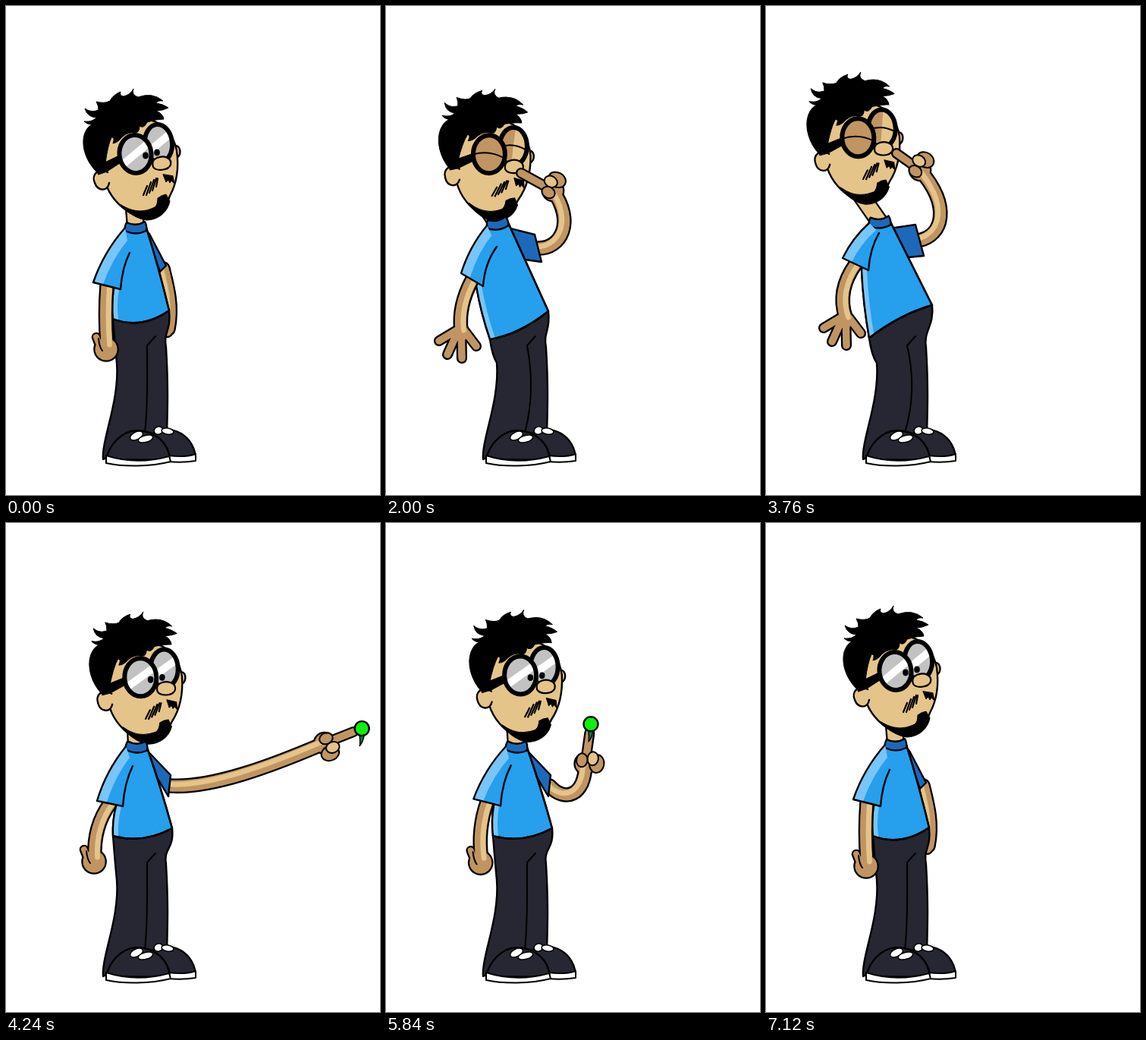
An HTML page with a canvas for the animation above (7200 ms loop, 493 px wide and 644 px high).

```html
<!DOCTYPE html>
<html lang="en">
<head>
<meta charset="utf-8">
<title>Nose</title>
<style>
html, body { margin: 0; width: 100%; height: 100%; overflow: hidden; background: #fff; }
canvas { display: block; }
</style>
</head>
<body>
<canvas id="stage" width="493" height="644"></canvas>
<script>
const ctx = document.getElementById('stage').getContext('2d');
const LOOP = 7200, STEP = 80;
const SKIN = '#e5c489', SHADE = '#c09562', BLUE = '#269fec', DEEP = '#1c69ba',
      PALE = '#78c5f8', DARK = '#272733', INK = '#000';

// Poses. h: head x, y, tilt; c: collar x, y, tilt; s: front sleeve outer, inner, fold;
// w: right hem, left hem, hem bulge, back bulge; r: back sleeve top, bottom, armpit;
// l: front elbow, hand; a: back arm curve, hand, fingertip; f: eyes open, hand spread.
const rest = {
  h: [0, 0, 0], c: [171, 292, 0], s: [115, 364, 151, 373, 163, 325],
  w: [215, 401, 141, 412, 20, 2], r: [211, 342, 203, 350, 190, 315],
  l: [130, 405, 133, 446], a: [213, 370, 220, 395, 214, 425, 213, 430], f: [1, 0]
};
const pick = {
  h: [-29, -2, 7], c: [147, 287, -8], s: [99, 352, 128, 369, 146, 317],
  w: [214, 402, 137, 439, 12, 0], r: [196, 301, 205, 337, 183, 334],
  l: [95, 395, 99, 427], a: [230, 320, 250, 285, 220, 243, 178, 220], f: [0, 1]
};
const dig = {
  h: [-46, -23, 4], c: [150, 285, -3], s: [101, 332, 135, 348, 149, 299],
  w: [219, 394, 136, 437, -10, 0], r: [197, 288, 208, 329, 187, 331],
  l: [93, 375, 105, 410], a: [232, 302, 245, 265, 203, 216, 172, 194], f: [0, 1]
};
const show = {
  h: [17, 7, 8], c: [172, 295, 3], s: [120, 366, 154, 373, 167, 320],
  w: [219, 402, 141, 412, 16, 2], r: [217, 332, 214, 360, 196, 330],
  l: [130, 405, 134, 446], a: [235, 370, 262, 362, 264, 318, 270, 278], f: [1, 0]
};
const eat = {
  h: [47, 18, 10], c: [161, 296, 18], s: [97, 353, 136, 370, 154, 316],
  w: [215, 407, 126, 423, -8, -13], r: [208, 322, 210, 365, 189, 357],
  l: [95, 400, 101, 434], a: [250, 348, 306, 335, 284, 303, 236, 274], f: [0, 1]
};
const raise = {
  ...rest, h: [4, 2, 2], s: [108, 360, 146, 373, 160, 322], r: show.r,
  l: [122, 402, 119, 440], a: [240, 368, 280, 355, 283, 320, 296, 284]
};
const pull = {
  ...pick, h: [-12, 8, 0], c: [158, 291, -4], r: [205, 305, 210, 340, 185, 335],
  l: [70, 365, 46, 345], a: [250, 330, 300, 290, 330, 262, 364, 250], f: [1, 1]
};
const swing = {
  ...show, h: [10, 7, 4], l: [115, 400, 117, 440],
  a: [270, 350, 350, 320, 420, 290, 458, 275]
};
const settle = { ...show, h: [9, 7, 4], a: [250, 370, 310, 350, 325, 305, 340, 268] };
const brace = {
  ...show, h: [-3, -2, -2], s: [106, 358, 145, 371, 160, 318],
  l: [102, 400, 109, 432], a: [235, 365, 265, 355, 260, 315, 265, 274], f: [1, 1]
};
const gulp = { ...eat, a: [255, 352, 318, 330, 298, 300, 252, 276] };
const fling = {
  ...eat, h: [15, 12, 2], c: [167, 294, 6], l: [75, 370, 60, 370],
  a: [250, 345, 310, 320, 330, 290, 350, 262], f: [1, 1]
};

const keys = [[0, rest], [1440, rest], [1600, raise], [1680, raise], [2000, pick]];
for (let t = 2080; t < 3600; t += 400) keys.push([t, pick], [t + 80, dig], [t + 320, pick]);
keys.push([3680, pick], [3760, dig], [4000, pull], [4080, pull], [4240, swing],
  [4400, settle], [4480, settle], [4800, show], [5760, show], [6000, brace],
  [6080, brace], [6320, eat], [6400, gulp], [6480, gulp], [6640, fling],
  [6800, raise], [6880, raise], [7120, rest], [LOOP, rest]);

function poseAt(t) {
  const i = keys.findIndex(k => k[0] > t);
  const [t0, p] = keys[i - 1], [t1, q] = keys[i];
  const k = (t - t0) / (t1 - t0), out = {};
  for (const n in p) out[n] = p[n].map((v, j) => v + (q[n][j] - v) * k);
  for (const b of [160, 560, 5360])
    if (t >= b && t < b + 160) out.f[0] = t < b + 80 ? 0.5 : 0;
  return out;
}

const rad = d => d * Math.PI / 180;

function paint(path, fill, line = 2.4) {
  if (fill) { ctx.fillStyle = fill; ctx.fill(path); }
  if (line) { ctx.strokeStyle = INK; ctx.lineWidth = line; ctx.stroke(path); }
}
const draw = (d, fill, line) => paint(new Path2D(d), fill, line);

function oval(x, y, rx, ry, fill, line, tilt = 0) {
  const p = new Path2D();
  p.ellipse(x, y, rx, ry, rad(tilt), 0, 7);
  paint(p, fill, line);
}

function inside(path, fn) {
  ctx.save();
  ctx.clip(path);
  fn();
  ctx.restore();
}

function strokeWith(path, color, width) {
  ctx.strokeStyle = color;
  ctx.lineWidth = width;
  ctx.stroke(path);
}

// Joined limbs: outline first, then flesh, then a light edge along the arm.
function limb(parts, dx, dy) {
  const all = parts.map(([d, w]) => [new Path2D(d), w]);
  for (const [p, w] of all) strokeWith(p, INK, w + 4.6);
  for (const [p, w] of all) strokeWith(p, SHADE, w);
  ctx.save();
  ctx.translate(dx, dy);
  strokeWith(all[0][0], SKIN, all[0][1] * 0.45);
  ctx.restore();
}

function lens(x, y, rx, ry, px, py, open, second) {
  const p = new Path2D();
  p.ellipse(x, y, rx, ry, rad(-6), 0, 7);
  inside(p, () => {
    ctx.fillStyle = '#c2c2c2';
    ctx.fillRect(x - 30, y - 30, 60, 60);
    strokeWith(new Path2D(`M${x - 24} ${y + 20}L${x + 24} ${y - 20}`), '#fff', 10);
    oval(px, py, 3.8, 4.4, INK, 0);
    if (open < 1) {
      const edge = y - ry + 2 * ry * (1 - open);
      ctx.fillStyle = SHADE;
      ctx.fillRect(x - 30, y - 30, 60, edge - y + 30);
      if (second) {
        ctx.fillStyle = SKIN;
        ctx.fillRect(x, y - 30, 30, edge - y + 30);
      }
      const ly = open ? edge : y + 3;
      draw(`M${x - rx} ${ly}Q${x} ${ly - 9} ${x + rx} ${ly}`, null, 2);
    }
  });
  paint(p, null, 6);
}

function head(p) {
  const [x, y, tilt] = p.h, open = p.f[0];
  ctx.save();
  ctx.translate(150 + x, 150 + y);
  ctx.rotate(rad(tilt));
  ctx.translate(-150, -150);
  oval(224, 192, 5.5, 8, SKIN);
  draw('M130 200L133 238C140 255 154 268 172 277C200 286 212 262 216 250C226 232 228 212 225 190C220 168 208 155 190 150L130 160Z', SKIN);
  draw('M134 219C122 212 112 222 117 233C121 244 134 245 136 233', SKIN);
  draw('M152 262C168 272 182 272 196 265Q200 262 200 253Q205 249 211 248L216 257C213 272 200 282 185 282Q166 279 152 262Z', INK, 1);
  draw('M181 249L186 237M185 249L191 232M189 246L195 229M193 243L198 227M198 238L200 227', null, 2.2);
  draw('M207 222L211 232L214 229L216 233L218 230L222 234L220 224Z', INK, 1);
  draw('M121 220C106 206 99 186 103 170Q106 160 113 156Q107 156 103 152Q114 153 119 147Q107 146 104 135Q112 141 122 137Q122 131 119 126Q130 129 137 125Q141 117 151 113Q149 118 155 119Q164 117 168 109Q165 117 174 120Q193 113 207 125Q200 124 198 128Q207 129 214 134Q206 138 198 138Q207 142 208 149Q198 149 186 153Q182 162 176 158Q176 167 170 167Q158 165 149 177Q146 180 141 181Q144 172 139 173Q134 184 131 207Z', INK, 1);
  draw('M118 212L149 197L150 207L133 218L122 222Z', INK, 1);
  lens(201, 181, 18, 25, 199, 193, open, true);
  lens(170.5, 195, 21, 25, 184, 197, open, false);
  draw('M194 212C198 218 214 217 217 209C219 200 208 196 199 200Q191 203 194 212Z', SKIN, 2.2);
  ctx.restore();
}

function neck(p) {
  const [x, y, tilt] = p.h, a = rad(tilt), u = 18, v = 106;
  const nx = 150 + x + u * Math.cos(a) - v * Math.sin(a);
  const ny = 150 + y + u * Math.sin(a) + v * Math.cos(a);
  const line = new Path2D(`M${nx} ${ny}L${p.c[0]} ${p.c[1]}`);
  strokeWith(line, INK, 24);
  strokeWith(line, SKIN, 19.5);
}

// Shoulder points at both ends of the collar.
function shoulders(p) {
  const [x, y, tilt] = p.c, dx = 14 * Math.cos(rad(tilt)), dy = 14 * Math.sin(rad(tilt));
  return [x - dx, y - dy, x + dx, y + dy];
}

function backArm(p, blob) {
  const [x1, y1, x2, y2, hx, hy, tx, ty] = p.a, r = p.r;
  const d = Math.hypot(tx - hx, ty - hy), ux = (tx - hx) / d, uy = (ty - hy) / d;
  const size = Math.min(13, 4.5 + d * 0.25);
  const at = (u, v) => [hx + ux * u - uy * v, hy + uy * u + ux * v];
  const sx = (r[0] + r[2]) / 2, sy = (r[1] + r[3]) / 2;
  limb([
    [`M${sx} ${sy}C${x1} ${y1} ${x2} ${y2} ${hx} ${hy}`, 15],
    [`M${hx} ${hy}L${tx} ${ty}`, 9.5],
    [`M${hx} ${hy}l.1 0`, size * 2]
  ], -3, -2);
  if (d > 20) {
    const lean = Math.atan2(uy, ux) * 180 / Math.PI;
    for (const [u, v, k, c] of [[2, 15, 12, SHADE], [8, 9, 9, SKIN], [4, -5, 9, SHADE]]) {
      const [x, y] = at(u, v);
      oval(x, y, k, k * 0.8, c, 2, lean);
    }
  }
  if (blob) {
    const bx = tx + ux * 12, by = ty + uy * 12;
    draw(`M${bx - 3} ${by + 9}q1 12 0 14q4 -4 6 -14z`, '#08804a', 1.5);
    oval(bx, by, 9.5, 9.5, '#0df20d');
  }
  const [, , cx, cy] = shoulders(p);
  draw(`M${cx - 4} ${cy}L${cx + 4} ${cy + 8}L${r[0]} ${r[1]}L${r[2]} ${r[3]}L${r[4]} ${r[5]}Z`, DEEP);
}

// Shirt hem from the right hip to the left hip.
const hem = ([rx, ry, lx, ly, bulge]) =>
  `L${rx} ${ry}Q${(rx + lx) / 2} ${(ry + ly) / 2 + bulge} ${lx} ${ly}`;

function legs(p) {
  const [rx, ry, lx, ly] = p.w, knee = Math.min(ly + 38, 460);
  draw(`M211 450C207 428 ${rx + 3} ${ry + 28} ${rx} ${ry}${hem(p.w)}Q${lx + 3} ${knee} 146 470C150 520 126 570 128 597L212 564C213 530 214 500 211 450Z`, DARK);
  const bend = (ly - ry) * 0.25;
  draw(`M197 435L186 447C${183 + bend} 480 ${185 + bend} 520 183 562`, null, 2);
}

function shoes() {
  draw('M192 564C207 550 246 558 250 594L216 597Z', DARK);
  draw('M214 592Q235 595 250 590L250 599Q232 602 214 600Z', '#fff', 2);
  oval(201, 559, 6, 5, '#fff', 1.5, -20);
  oval(213, 560, 8, 4, '#fff', 1.5, 10);
  draw('M132 597C136 578 152 560 172 559C197 559 215 576 216 598Z', DARK);
  draw('M132 592C160 601 190 600 215 593L217 600C190 607 155 607 132 602Z', '#fff', 2);
  oval(172, 566, 9, 5, '#fff', 1.5, -25);
  oval(184, 570, 10, 4.5, '#fff', 1.5, -15);
}

function shirt(p) {
  const [cx, cy, tilt] = p.c, [rx, ry, lx, ly, , back] = p.w;
  const [ax, ay, bx, by] = shoulders(p);
  const ix = p.s[2] - 9, iy = p.s[3];
  const side = `Q${(lx + ix) / 2 - 3} ${(ly + iy) / 2} ${ix} ${iy}`;
  const body = new Path2D(`M${ax} ${ay}L${bx} ${by}Q${(bx + rx) / 2 + back} ${(by + ry) / 2} ${rx} ${ry}${hem(p.w)}${side}Z`);
  paint(body, BLUE);
  inside(body, () => strokeWith(new Path2D(`M${lx} ${ly}${side}`), PALE, 14));
  paint(body);
  ctx.save();
  ctx.translate(cx, cy);
  ctx.rotate(rad(tilt));
  draw('M-12 -7Q0 -1 12 -8Q15 -3 14 4Q0 11 -14 4Q-15 -2 -12 -7Z', DEEP);
  ctx.restore();
}

function frontArm(p) {
  const [ex, ey, hx, hy] = p.l, [ox, oy, ix, iy, fx, fy] = p.s;
  const arm = [`M${(ox + ix) / 2} ${(oy + iy) / 2}Q${ex} ${ey} ${hx} ${hy}`, 15];
  const finger = (dx, dy) => [`M${hx + dx * 0.2} ${hy}L${hx + dx} ${hy + dy}`, 9.5];
  const spread = p.f[1] > 0.5;
  limb(spread
    ? [arm, finger(-29, 14), finger(-18, 32), finger(1, 37), finger(20, 21), [`M${hx - 1} ${hy + 4}l.1 0`, 21]]
    : [arm, [`M${hx - 1} ${hy + 6}l.1 0`, 29], [`M${hx - 7} ${hy + 8}L${hx - 14} ${hy - 10}`, 8]],
  3.5, 0);
  if (!spread) draw(`M${hx - 11} ${hy - 8}Q${hx - 10} ${hy + 3} ${hx - 6} ${hy + 8}`, null, 2);

  const [sx, sy] = shoulders(p), dx = ox - sx, dy = oy - sy;
  const edge = `M${sx} ${sy}Q${sx + dx / 2 - dy * 0.1} ${sy + dy / 2 + dx * 0.1} ${ox} ${oy}`;
  const line = new Path2D(`${edge}L${ix} ${iy}Q${ix + 2} ${(iy + fy) / 2 - 4} ${fx} ${fy}`);
  ctx.fillStyle = BLUE;
  ctx.fill(line);
  inside(line, () => strokeWith(new Path2D(edge), PALE, 26));
  paint(line);
}

function render(t) {
  const p = poseAt(t);
  ctx.fillStyle = '#fff';
  ctx.fillRect(0, 0, 493, 644);
  ctx.lineCap = ctx.lineJoin = 'round';
  neck(p);
  head(p);
  backArm(p, t >= 3840 && t < 6320);
  legs(p);
  shirt(p);
  shoes();
  frontArm(p);
}

const start = performance.now();
function tick() {
  const t = (performance.now() - start) % LOOP;
  render(Math.floor(t / STEP) * STEP);
  requestAnimationFrame(tick);
}
tick();
</script>
</body>
</html>
```
